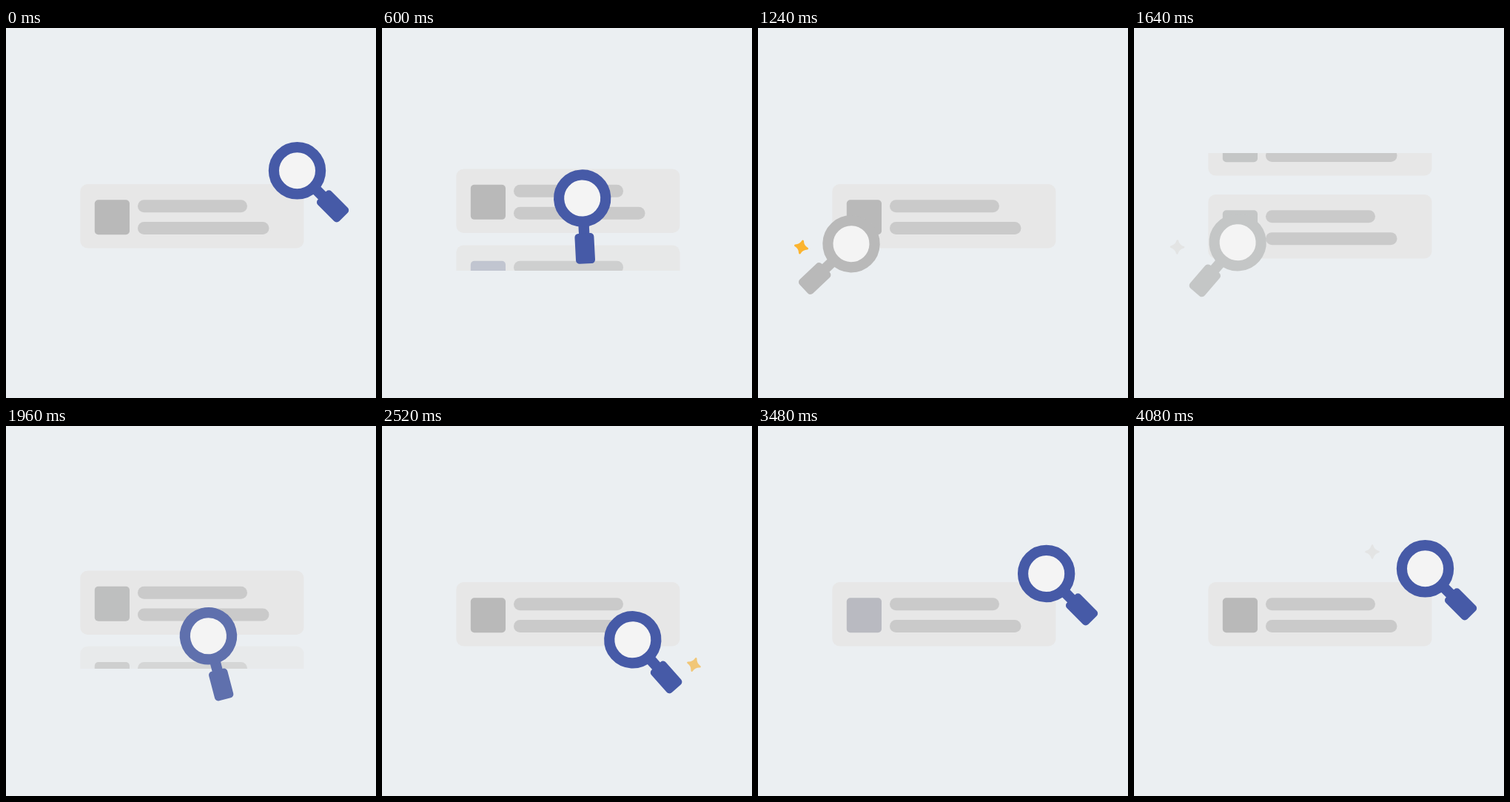
An HTML page with a canvas for the animation above (4200 ms loop, 500 by 500 pixels).

```html
<!DOCTYPE html>
<html lang="en">
<head>
<meta charset="utf-8">
<title>Searching a list</title>
<style>
  html, body { margin: 0; width: 100%; height: 100%; overflow: hidden; background: #ebeff2; }
  canvas { display: block; }
</style>
</head>
<body>
<canvas width="500" height="500"></canvas>
<script>
const ctx = document.querySelector('canvas').getContext('2d');
const LOOP = 4200, STEP = 40, LAST = 4080;

const GREY = [185, 185, 185], PALE = [196, 198, 198];
const BLUE = [70, 90, 167], TINT = [184, 190, 217], DIM = [186, 189, 203];
const GOLD = [251, 180, 48], ASH = [227, 228, 228];

// Stops of the glass: centre and handle angle from straight down
const STOPS = [
  { x: 393.5, y: 192.8, angle: 45 },
  { x: 126, y: 291.7, angle: -46.5 },
  { x: 338.8, y: 288.8, angle: 41.8 }
];
const LEGS = [
  { start: 114, arc: 8.2 },
  { start: 1385, arc: 7 },
  { start: 2740, arc: 0 }
];
const LEG_TIME = 1000;

const SCROLLS = [162, 1499, 2785];
const SCROLL_TIME = 600;

const STARS = [
  { start: 1080, x: 58.5, y: 296 },
  { start: 2200, x: 421.5, y: 322.5 },
  { start: 3500, x: 322, y: 170 }
];
const STAR_TIME = 640;

const GLASS_COLOURS = [[900, BLUE], [1160, GREY], [1240, GREY], [1640, PALE], [2040, BLUE]];
const ICON_COLOURS = [[1240, GREY], [1640, PALE], [2200, GREY], [2640, GREY],
                      [2800, TINT], [3360, TINT], [3520, GREY]];

const clamp = v => Math.min(1, Math.max(0, v));
const lerp = (a, b, p) => a + (b - a) * p;
const smooth = p => p * p * (3 - 2 * p);
const cubic = p => p < .5 ? 4 * p ** 3 : 1 - 4 * (1 - p) ** 3;
const mix = (a, b, p) => a.map((v, i) => lerp(v, b[i], p));
const css = c => `rgb(${c.map(Math.round)})`;

function colourAt(keys, t) {
  let colour = keys[0][1];
  for (let i = 1; i < keys.length; i++) {
    const [from, a] = keys[i - 1], [to, b] = keys[i];
    if (t > from) colour = mix(a, b, clamp((t - from) / (to - from)));
  }
  return colour;
}

function box(x, y, w, h, r, fill) {
  ctx.fillStyle = fill;
  ctx.beginPath();
  ctx.roundRect(x, y, w, h, r);
  ctx.fill();
}

function card(y, icon, alpha) {
  ctx.globalAlpha = alpha;
  box(100.3, y, 302.2, 86.4, 10, '#e7e7e7');
  box(119.8, y + 21.3, 47.2, 47, 5, css(icon));
  box(178, y + 21.3, 148, 17, 8.5, '#cacaca');
  box(178, y + 51.1, 177.5, 17, 8.5, '#cacaca');
  ctx.globalAlpha = 1;
}

function list(t) {
  const icon = colourAt(ICON_COLOURS, t);
  const n = SCROLLS.findIndex(s => t > s && t < s + SCROLL_TIME);
  ctx.save();
  ctx.beginPath();
  ctx.rect(0, 169, 500, 159);
  ctx.clip();
  if (n < 0) {
    card(211, icon, 1);
  } else {
    const p = smooth((t - SCROLLS[n]) / SCROLL_TIME);
    const leaving = n ? icon : mix(GREY, DIM, clamp(p / .8));
    card(211 + 100.4 * p, leaving, clamp((1 - p) / .22));
    card(211 - 113.9 * (1 - p), icon, clamp(p / .1));
  }
  ctx.restore();
}

function glass(t) {
  const n = LEGS.findLastIndex(leg => t >= leg.start);
  const leg = LEGS[Math.max(n, 0)];
  const p = n < 0 ? 0 : cubic(clamp((t - leg.start) / LEG_TIME));
  const a = STOPS[Math.max(n, 0)], b = STOPS[(Math.max(n, 0) + 1) % 3];
  const colour = css(colourAt(GLASS_COLOURS, t));
  ctx.save();
  ctx.translate(lerp(a.x, b.x, p), lerp(a.y, b.y, p) - 4 * leg.arc * p * (1 - p));
  ctx.rotate(-lerp(a.angle, b.angle, p) * Math.PI / 180);
  box(-7.2, 34, 14.4, 18, 0, colour);
  box(-13, 47.5, 26, 41, 5, colour);
  ctx.beginPath();
  ctx.arc(0, 0, 31.6, 0, 2 * Math.PI);
  ctx.fillStyle = '#f4f4f4';
  ctx.fill();
  ctx.lineWidth = 14.2;
  ctx.strokeStyle = colour;
  ctx.stroke();
  ctx.restore();
}

function star({ start, x, y }, t) {
  const age = t - start;
  if (age <= 0 || age >= STAR_TIME) return;
  const size = clamp(age / 50);
  ctx.save();
  ctx.translate(x, y);
  ctx.rotate(Math.sin(Math.PI * clamp(age / 580)) * .33);
  ctx.scale(size, size);
  ctx.beginPath();
  ctx.moveTo(0, -8.5);
  for (let i = 1; i <= 4; i++) {
    const turn = i * Math.PI / 2, mid = turn - Math.PI / 4;
    ctx.quadraticCurveTo(2.6 * Math.sin(mid), -2.6 * Math.cos(mid),
                         8.5 * Math.sin(turn), -8.5 * Math.cos(turn));
  }
  ctx.closePath();
  ctx.fillStyle = ctx.strokeStyle = css(mix(GOLD, ASH, clamp((age - 180) / 350)));
  ctx.lineWidth = 2.6;
  ctx.lineJoin = 'round';
  ctx.fill();
  ctx.stroke();
  ctx.restore();
}

const began = performance.now();
function draw() {
  const now = (performance.now() - began) % LOOP;
  const t = Math.min(LAST, Math.floor(now / STEP) * STEP);
  ctx.fillStyle = '#ebeff2';
  ctx.fillRect(0, 0, 500, 500);
  list(t);
  STARS.forEach(s => star(s, t));
  glass(t);
  requestAnimationFrame(draw);
}
draw();
</script>
</body>
</html>
```
